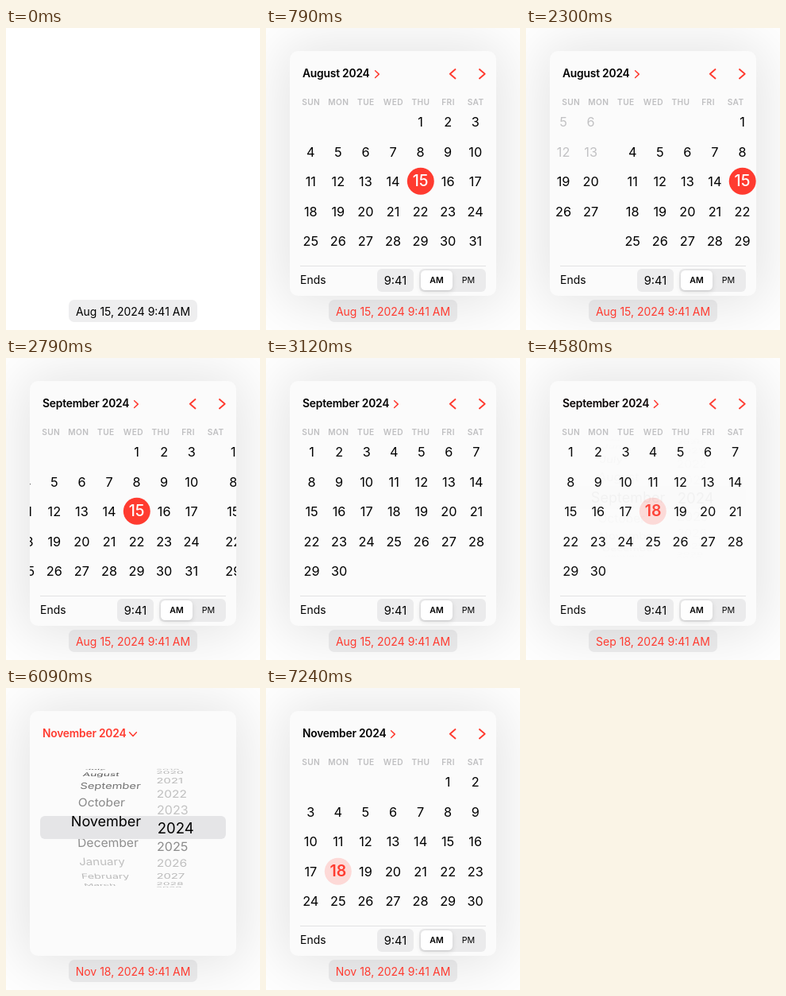
An HTML page that plays this animation: 320x380 px, repeating every 8000 ms.

```html
<!DOCTYPE html>
<html lang="en">
<head>
<meta charset="utf-8">
<title>Date picker</title>
<style>
  html, body { margin: 0; width: 100%; height: 100%; overflow: hidden; background: #fff; }
  #stage { position: relative; width: 320px; height: 380px; overflow: hidden;
    font: 16.3px/1 Inter, Roboto, sans-serif; color: #000; white-space: nowrap; }
  #stage * { position: absolute; box-sizing: border-box; }
  #stage svg { overflow: visible; fill: none; stroke: #ff3b30; stroke-linecap: round; stroke-linejoin: round; }
  .layer { left: 0; top: 0; width: 320px; height: 380px; }
  .mid { transform: translate(-50%, -50%); }
  #popover { transform-origin: 160px 342px; }
  #card { left: 30px; top: 29px; width: 260px; height: 308px; border-radius: 10px;
    background: #fbfbfb; box-shadow: 0 2px 70px 12px rgba(0, 0, 0, .105); }
  #pages { clip-path: inset(100px 30px 82px 30px); }
  #title { left: 46px; top: 57.5px; transform: translateY(-50%); font-size: 13.8px; font-weight: 600; letter-spacing: -.2px; }
  #title svg { left: 100%; top: 1px; margin-left: 3px; stroke-width: 1.5; }
  .weekday { font-size: 10.2px; font-weight: 600; letter-spacing: .4px; color: #bfbfc1; }
  .past { color: #c2c2c4; }
  .disc { width: 34.4px; height: 34.4px; border-radius: 50%; font-size: 19.5px; font-weight: 500;
    display: flex; align-items: center; justify-content: center; }
  .today { background: #ff3b30; color: #fff; }
  .chosen { background: #fdd9d7; color: #ff3b30; font-weight: 600; }
  .rule { left: 43px; top: 299px; width: 234px; height: 1px; background: #e2e2e3; }
  .box { top: 303px; height: 29px; border-radius: 6px; background: #ebebec; }
  .thumb { left: 195px; top: 305px; width: 40px; height: 25px; border-radius: 5.5px; background: #fff;
    box-shadow: 0 2px 6px rgba(0, 0, 0, .12), 0 1px 1px rgba(0, 0, 0, .04); }
  #lens { left: 43px; top: 161px; width: 234px; height: 29px; border-radius: 6px; background: #e5e5e7; overflow: hidden; }
  #lens > div { left: -43px; top: -161px; }
  .row { left: 0; top: 0; transform-origin: 0 50%; }
  #pill { left: 79px; top: 342px; width: 162px; height: 28px; border-radius: 7px; background: rgba(118, 118, 128, .125); }
  #date { left: 160px; top: 356.5px; font-size: 14px; }
</style>
</head>
<body>
<div id="stage">
  <div id="popover" class="layer">
    <div id="card"></div>
    <div id="calendar" class="layer">
      <svg class="layer" viewBox="0 0 320 380" stroke-width="1.9">
        <path d="M238.5 52L231.8 57.7L238.5 63.5M269 52L275.7 57.7L269 63.5"/>
      </svg>
      <div id="pages" class="layer"></div>
      <div class="rule"></div>
      <div class="mid" style="left:59.3px;top:318px;font-size:13.9px">Ends</div>
      <div class="box" style="left:140px;width:46px"></div>
      <div class="mid" style="left:163px;top:318px;font-size:14.7px">9:41</div>
      <div class="box" style="left:193px;width:84px"></div>
      <div class="thumb"></div>
      <div class="mid" style="left:215px;top:318px;font-size:10.6px;font-weight:600">AM</div>
      <div class="mid" style="left:255px;top:318px;font-size:10.7px">PM</div>
    </div>
    <div id="wheels" class="layer">
      <div id="rim" class="layer"></div>
      <div id="lens"><div class="layer"></div></div>
    </div>
    <div id="title"><span style="position:static"></span>
      <svg width="12" height="12" viewBox="0 0 12 12"><path d="M3.6 1.6L8.3 6L3.6 10.4"/></svg>
    </div>
  </div>
  <div id="pill"></div>
  <div id="date" class="mid"></div>
</div>
<script>
const LOOP = 8000, PAGE = 260, DEG = Math.PI / 180;
const MONTHS = ['January', 'February', 'March', 'April', 'May', 'June', 'July',
  'August', 'September', 'October', 'November', 'December'];
const BLACK = [0, 0, 0], RED = [255, 59, 48];
const $ = selector => document.querySelector(selector);

function add(parent, className, text = '', x, y) {
  const el = document.createElement('div');
  el.className = className;
  el.textContent = text;
  if (x !== undefined) { el.style.left = x + 'px'; el.style.top = y + 'px'; }
  parent.append(el);
  return el;
}

function bezier(x1, y1, x2, y2) {
  const at = (a, b, s) => 3 * (1 - s) ** 2 * s * a + 3 * (1 - s) * s * s * b + s ** 3;
  return x => {
    let lo = 0, hi = 1;
    for (let i = 0; i < 24; i++) {
      const s = (lo + hi) / 2;
      if (at(x1, x2, s) < x) lo = s; else hi = s;
    }
    return at(y1, y2, lo);
  };
}
const swipeEase = bezier(.2, .2, .25, 1);
const dragEase = bezier(.3, .2, .6, 1);
const softEase = bezier(.42, 0, .58, 1);
const settleEase = bezier(.3, 0, .3, 1);
const phase = (t, start, length) => Math.min(1, Math.max(0, (t - start) / length));
const mix = (a, b, k) => `rgb(${a.map((v, i) => Math.round(v + (b[i] - v) * k))})`;
const spring = (ms, rate) => ms <= 0 ? 0 : 1 - (1 + rate * ms / 1000) * Math.exp(-rate * ms / 1000);

// Calendar pages
const column = i => 56.3 + 34.57 * i;
['SUN', 'MON', 'TUE', 'WED', 'THU', 'FRI', 'SAT'].forEach((name, i) =>
  add($('#calendar'), 'mid weekday', name, column(i) + .4, 92.5));

const cells = {};
const pages = [6, 7, 8, 10].map(month => {
  const el = add($('#pages'), 'layer');
  const first = new Date(2024, month, 1).getDay();
  const days = new Date(2024, month + 1, 0).getDate();
  for (let day = 1; day <= days; day++) {
    const slot = first + day - 1;
    const past = month === 6 && day < 16;
    cells[month + '/' + day] = add(el, past ? 'mid past' : 'mid', day,
      column(slot % 7), 118 + 37.5 * Math.floor(slot / 7));
  }
  return { month, el };
});
cells['7/15'].className = 'mid disc today';
cells['10/18'].className = 'mid disc chosen';

const swipes = [[1370, -1], [2150, 1], [2760, 1]];
const pagePosition = t => t > 5500 ? 10
  : swipes.reduce((p, [start, step]) => p + step * swipeEase(phase(t, start, 400)), 7);

// Month and year wheels
const RADIUS = 74, DEPTH = 300, CENTER = 176.3, ZOOM = 1.14, REACH = 5;
const lensLayer = $('#lens > div');
const makeRows = (parent, size) => Array.from({ length: 2 * REACH + 1 }, () => {
  const el = add(parent, 'row');
  el.style.fontSize = size + 'px';
  return el;
});
const makeWheel = options => ({ ...options,
  rim: makeRows($('#rim'), options.size), lens: makeRows(lensLayer, options.size) });
const monthWheel = makeWheel({ size: 15.8, left: 89.6, axis: 145, step: 20.3,
  text: i => MONTHS[(i + 12) % 12], enabled: i => (i + 12) % 12 > 5 });
const yearWheel = makeWheel({ size: 16.3, left: 190, axis: 185, step: 18,
  text: i => i, enabled: i => i === 2024 || i === 2025 });

function drawWheel(wheel, value) {
  const base = Math.round(value);
  for (let k = -REACH; k <= REACH; k++) {
    const index = base + k;
    const degrees = (index - value) * wheel.step;
    const angle = degrees * DEG, cos = Math.cos(angle), sin = Math.sin(angle);
    const far = DEPTH + RADIUS * (1 - cos);
    const scale = DEPTH / far;
    const offset = wheel.left - wheel.axis;
    const lean = -.75 * offset * DEPTH * sin / far ** 2;
    const shade = wheel.enabled(index) ? 145 - 100 * (1 - cos) : 196 - 25 * (1 - cos);
    const place = (el, zoom, color) => {
      el.textContent = wheel.text(index);
      el.style.display = Math.abs(degrees) < 91 ? '' : 'none';
      el.style.color = color;
      const x = wheel.axis + offset * scale * zoom;
      const y = CENTER + RADIUS * sin * zoom - wheel.size / 2;
      el.style.transform = `matrix(${scale * zoom},0,${lean},${Math.max(.1, cos) * zoom},${x},${y})`;
    };
    place(wheel.rim[k + REACH], 1, `rgb(${shade},${shade},${shade})`);
    place(wheel.lens[k + REACH], ZOOM, '#000');
  }
}

const wheelPosition = t =>
  8 + 2.35 * dragEase(phase(t, 5430, 780)) - .35 * settleEase(phase(t, 6215, 455));

function shownMonth(t) {
  if (t >= 5430) return Math.round(wheelPosition(t));
  return swipes.reduce((m, [start, step]) => m + (t > start + 15 ? step : 0), 7);
}

function draw(t) {
  const opened = phase(t, 275, 150);
  const grown = t > 790 ? 1 : spring(t - 275, 16);
  $('#popover').style.opacity = opened;
  $('#popover').style.transform = `scale(${.15 + .85 * grown})`;

  const position = pagePosition(t);
  for (const { month, el } of pages) {
    const shift = month - position;
    el.style.display = Math.abs(shift) < 1 ? '' : 'none';
    el.style.transform = `translateX(${shift * PAGE}px)`;
  }
  cells['8/18'].className = t >= 3760 ? 'mid disc chosen' : 'mid';

  const wheelMode = softEase(phase(t, 4550, 240)) - softEase(phase(t, 6940, 300));
  $('#calendar').style.opacity = 1 - wheelMode;
  $('#wheels').style.opacity = wheelMode;
  drawWheel(monthWheel, wheelPosition(t));
  drawWheel(yearWheel, 2024);

  const month = shownMonth(t);
  $('#title span').textContent = MONTHS[month] + ' 2024';
  $('#title').style.color = mix(BLACK, RED, wheelMode);
  $('#title svg').style.transform = `rotate(${90 * wheelMode}deg)`;

  const day = t < 3760 ? 'Aug 15' : MONTHS[month].slice(0, 3) + ' 18';
  $('#date').textContent = day + ', 2024 9:41 AM';
  $('#date').style.color = mix(BLACK, RED, opened);
}

const began = performance.now();
function tick() {
  draw((performance.now() - began) % LOOP);
  requestAnimationFrame(tick);
}
tick();
</script>
</body>
</html>
```
